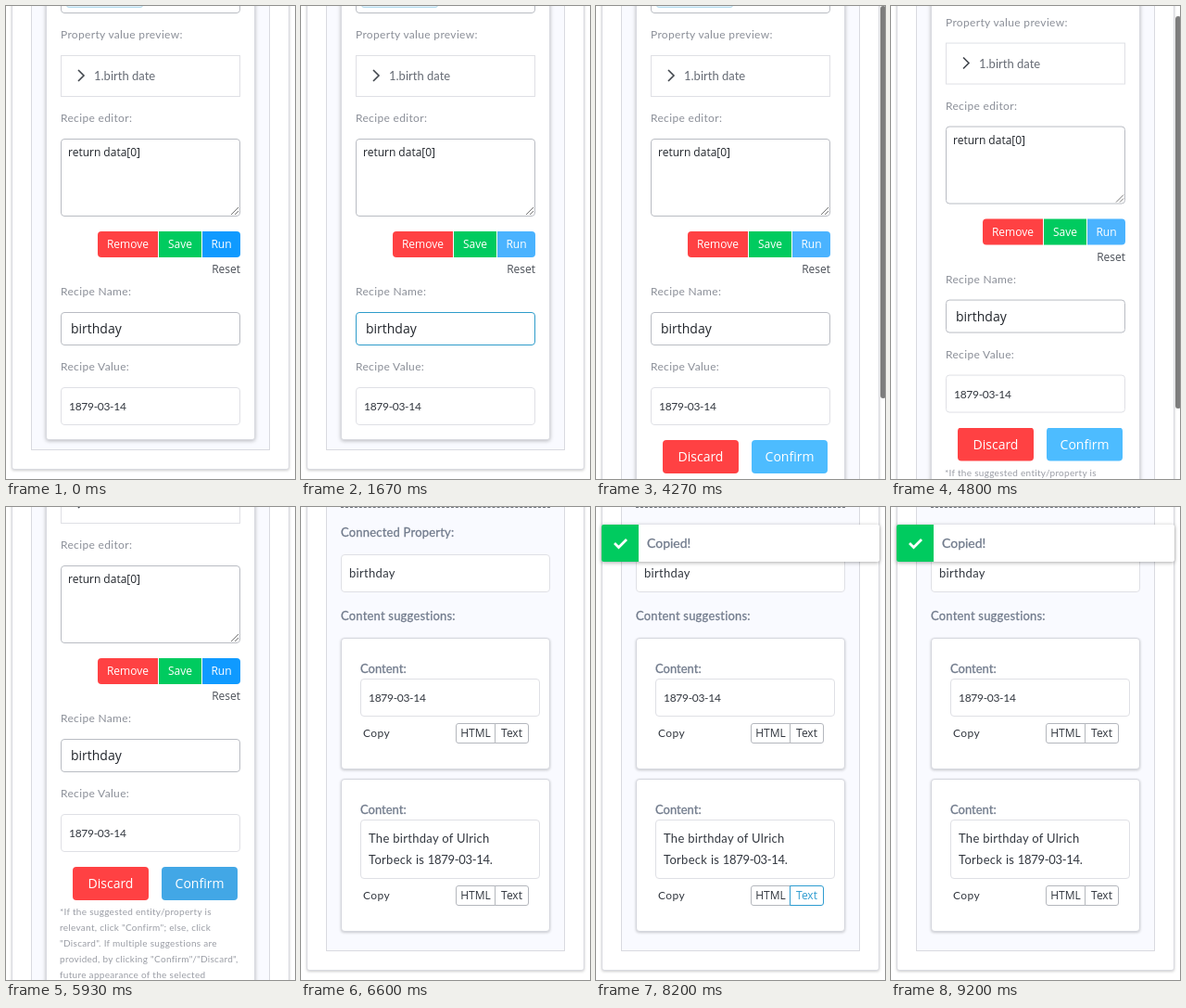
Animation, 312 px wide and 510 px high, one loop 9270 ms. Source, as an HTML page:

```html
<!DOCTYPE html>
<html lang="en">
<head>
<meta charset="utf-8">
<title>Recipe editor</title>
<style>
html, body { margin: 0; width: 100%; height: 100%; overflow: hidden; background: #fff; }
.stage { position: relative; width: 312px; height: 510px; overflow: hidden; font: 12px/20px Lato, sans-serif; color: #32373f; }
.stage div, .stage svg { position: absolute; box-sizing: border-box; white-space: nowrap; }
.layer { inset: 0; }

/* page frames */
.stage .frame { box-sizing: content-box; top: -20px; border: 1px solid #d9dae0; animation: grow 9.27s linear infinite; }
.outer { left: 6px; width: 298px; height: 518px; border-radius: 3px; background: #fff; box-shadow: 0 1px 3px #0003; }
.pane { left: 27px; width: 256px; height: 497px; background: #f9faff; }
.sheet { left: 43px; width: 224px; height: 486px; border-radius: 3px; background: #fff; box-shadow: 0 1px 4px #0004; }

/* text */
.label { left: 59px; color: #8b8f98; letter-spacing: .33px; }
.head { color: #717b8c; font-size: 13px; letter-spacing: .2px; -webkit-text-stroke: .3px; }
.body { font-size: 13px; letter-spacing: .3px; line-height: 23px; }
.date { letter-spacing: -.3px; }
.sans { font-family: "Open Sans", sans-serif; }
.note { left: 58px; top: 508px; font-size: 10px; line-height: 17.1px; letter-spacing: .3px; color: #9a9da5; }

/* controls */
.box { left: 59px; width: 194px; border: 1px solid #dfe0e5; background: #fff; }
.round { border-radius: 4px; }
.field { border-color: #b9bcc3; border-radius: 4px; }
.btn { top: 243px; height: 28px; line-height: 27px; color: #fff; text-align: center; font-family: "Open Sans", sans-serif; }
.big { top: 468px; width: 82px; height: 36px; line-height: 35px; font-size: 14px; border-radius: 4px; }
.card { left: 43px; width: 226px; border: 1px solid #d5d7de; border-radius: 4px; background: #fff; box-shadow: 0 1px 3px #0003; }
.card .box { left: 20px; top: 43px; border-radius: 4px; }
.card .head { left: 20px; top: 22px; letter-spacing: 0; }
.card .copy { left: 23px; letter-spacing: .4px; }
.card .opt { height: 22px; line-height: 20px; border: 1px solid #b4b7bd; text-align: center; font-family: "Open Sans", sans-serif; }
.card .html { left: 123px; width: 43px; border-radius: 3px 0 0 3px; }
.card .text { left: 165px; width: 37px; border-radius: 0 3px 3px 0; }

.toast { left: 6px; top: 19px; width: 300px; height: 40px; background: #fff; border-radius: 2px; overflow: hidden; }
.toast-wrap { left: 0; top: 0; filter: drop-shadow(0 1px 2px #0005); animation: toast 9.27s linear infinite; }
.thumb { left: 307px; top: 0; width: 6px; height: 423px; border-radius: 3px; background: #7d7d7d; animation: thumb 9.27s linear infinite; }

.form { animation: scroll 9.27s linear infinite; }
.editing { animation: editing 9.27s linear infinite; }
.results { animation: results 9.27s linear infinite; }
.extra { animation: extra 9.27s linear infinite; }
.value { animation: value 9.27s linear infinite; }
.value .date { animation: filled 9.27s linear infinite; }
.name { animation: focus 9.27s linear infinite; }
.save { animation: save 9.27s linear infinite; }
.run { animation: run 9.27s linear infinite; }
.confirm { animation: confirm 9.27s linear infinite; }
.picked { animation: picked 9.27s linear infinite; }

@keyframes grow { 0%, 43.9% { padding-bottom: 0 } 43.91%, 69.04% { padding-bottom: 200px } 69.05%, 100% { padding-bottom: 0 } }
@keyframes editing { 0%, 69.04% { visibility: visible } 69.05%, 100% { visibility: hidden } }
@keyframes results { 0%, 69.04% { opacity: 0 } 69.05%, 100% { opacity: 1 } }
@keyframes extra { 0%, 43.9% { opacity: 0 } 43.91%, 100% { opacity: 1 } }
@keyframes scroll {
  0%, 29.45% { transform: none }
  29.46%, 43.9% { transform: translateY(23px) }
  43.91% { transform: translateY(0) }
  50.38% { transform: translateY(0); animation-timing-function: ease-in-out }
  55.34%, 100% { transform: translateY(-80px) }
}
@keyframes thumb {
  0%, 43.9% { opacity: 0; transform: none }
  45%, 50.38% { opacity: 1; transform: translateY(0); animation-timing-function: ease-in-out }
  55.34%, 58.25% { opacity: 1; transform: translateY(66px) }
  60.4%, 100% { opacity: 0; transform: translateY(66px) }
}
@keyframes value { 0%, 29.45% { height: 41px } 29.46%, 43.9% { height: 18px } 43.91%, 100% { height: 41px } }
@keyframes filled { 0%, 29.45% { opacity: 1 } 29.46%, 43.9% { opacity: 0 } 43.91%, 100% { opacity: 1 } }
@keyframes focus { 0%, 10.79% { border-color: #b9bcc3 } 12.4%, 26.64% { border-color: #2e9cca } 28.3%, 100% { border-color: #b9bcc3 } }
@keyframes save { 0%, 24.49% { background: #00cb5f } 25.14%, 39.6% { background: #3ada88 } 41%, 100% { background: #00cb5f } }
@keyframes run {
  0%, .75%, 6.47%, 16.5%, 22.98%, 40.2%, 59%, 100% { background: #0f9aff }
  1.4%, 5.07%, 18%, 20.82%, 41.7%, 57.5% { background: #4ab3ff }
}
@keyframes confirm { 0%, 59.33% { background: #4dbcff } 60.73%, 100% { background: #42a7e6 } }
@keyframes picked {
  0%, 74.76% { color: #32373f; border-color: #b4b7bd }
  76.16%, 92% { color: #2e9cd0; border-color: #2e9cd0 }
  93.4%, 100% { color: #32373f; border-color: #b4b7bd }
}
@keyframes toast {
  0%, 76.91% { opacity: 0; transform: translateY(-50px); animation-timing-function: ease }
  81.23%, 100% { opacity: 1; transform: none }
}
</style>
</head>
<body>
<div class="stage">
  <div class="frame outer"></div>
  <div class="frame pane"></div>

  <div class="layer editing">
    <div class="frame sheet"></div>
    <div class="layer form">
      <div class="box field" style="top:-31px;height:39px"></div>
      <div style="left:65px;top:-22px;width:83px;height:24px;border:1px solid #b5dcee;border-radius:3px;background:#e3f3fc"></div>
      <div style="left:71px;top:-20px;color:#2e9cca">birth date</div>
      <svg style="left:130px;top:-15px" width="10" height="10" stroke="#2e9cca" stroke-width="1.5"><path d="M1 1l8 8M9 1l-8 8"/></svg>
      <svg style="left:230px;top:-13px" width="12" height="6" fill="#b7bfcb"><path d="M0 0h12l-6 6z"/></svg>

      <div class="label" style="top:21px">Property value preview:</div>
      <div class="box" style="top:53px;height:45px"></div>
      <svg style="left:76px;top:68px" width="10" height="14" fill="none" stroke="#41464d" stroke-width="1.6"><path d="M2 1l6 6-6 6"/></svg>
      <div style="left:95px;top:65px;font-size:13px;color:#666b74">1.birth date</div>

      <div class="label" style="top:111px">Recipe editor:</div>
      <div class="box field" style="top:143px;height:84px"></div>
      <div class="sans" style="left:67px;top:148px;color:#22262c">return data[0]</div>
      <svg style="left:242px;top:216px" width="10" height="10" stroke="#777"><path d="M1 9l8-8M5 9l4-4"/></svg>

      <div class="btn" style="left:99px;width:65px;background:#ff4143;border-radius:4px 0 0 4px">Remove</div>
      <div class="btn save" style="left:165px;width:46px">Save</div>
      <div class="btn run" style="left:212px;width:41px;border-radius:0 4px 4px 0">Run</div>
      <div class="sans" style="right:59px;top:274px;color:#4a4f57">Reset</div>

      <div class="label" style="top:298px">Recipe Name:</div>
      <div class="box field name" style="top:330px;height:36px"></div>
      <div class="sans" style="left:70px;top:338px;font-size:14px;color:#22262c">birthday</div>

      <div class="label" style="top:379px">Recipe Value:</div>
      <div class="box round value" style="top:411px">
        <div class="date" style="left:8px;top:10px">1879-03-14</div>
      </div>

      <div class="extra" style="left:0;top:0">
        <div class="btn big" style="left:72px;background:#ff4143">Discard</div>
        <div class="btn big confirm" style="left:168px">Confirm</div>
        <div class="note">*If the suggested entity/property is<br>relevant, click "Confirm"; else, click<br>"Discard". If multiple suggestions are<br>provided, by clicking "Confirm"/"Discard",<br>future appearance of the selected</div>
      </div>
    </div>
  </div>
  <div class="thumb"></div>

  <div class="layer results">
    <div style="left:43px;top:0;width:226px;border-top:1px dashed #777b84"></div>
    <div class="head" style="left:43px;top:17px">Connected Property:</div>
    <div class="box round" style="left:43px;top:51px;width:226px;height:41px"></div>
    <div class="body" style="left:52px;top:60px">birthday</div>
    <div class="head" style="left:43px;top:107px">Content suggestions:</div>

    <div class="card" style="top:141px;height:142px">
      <div class="head">Content:</div>
      <div class="box" style="height:41px"><div class="date" style="left:8px;top:10px">1879-03-14</div></div>
      <div class="copy" style="top:92px">Copy</div>
      <div class="opt html" style="top:91px">HTML</div>
      <div class="opt text" style="top:91px">Text</div>
    </div>

    <div class="card" style="top:293px;height:165px">
      <div class="head">Content:</div>
      <div class="box" style="height:64px"><div class="body" style="left:8px;top:8px">The birthday of Ulrich<br>Torbeck is <span class="date">1879-03-14.</span></div></div>
      <div class="copy" style="top:115px">Copy</div>
      <div class="opt html" style="top:114px">HTML</div>
      <div class="opt text picked" style="top:114px">Text</div>
    </div>
  </div>

  <div class="toast-wrap">
    <div class="toast">
      <div style="left:0;top:0;width:40px;height:40px;background:#00cb5f"></div>
      <svg style="left:13px;top:14px" width="15" height="13" fill="none" stroke="#fff" stroke-width="2.8"><path d="M1 6l4.5 4.5L14 2"/></svg>
      <div style="left:49px;top:10px;font-size:14px;color:#717b8c;-webkit-text-stroke:.3px">Copied!</div>
    </div>
  </div>
</div>
</body>
</html>
```
